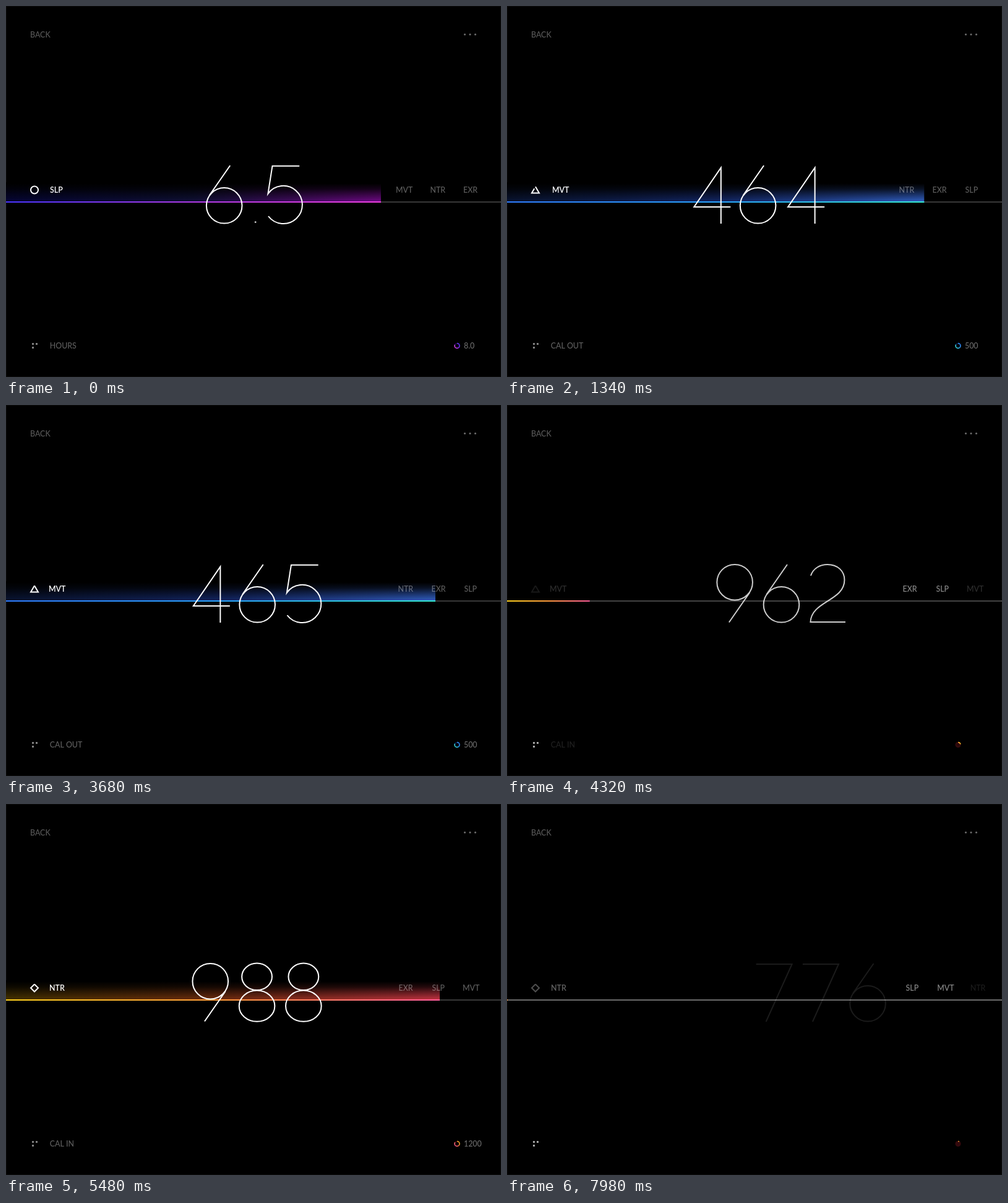
An HTML page with a canvas for the animation above (8000 ms loop, 800 by 600 pixels).

```html
<!DOCTYPE html>
<html lang="en">
<head>
<meta charset="utf-8">
<title>Daily tracker</title>
<style>
html, body { margin: 0; width: 100%; height: 100%; overflow: hidden; background: #000; }
canvas { display: block; }
</style>
</head>
<body>
<canvas id="stage" width="800" height="600"></canvas>
<script>
const ctx = document.getElementById('stage').getContext('2d');
const LOOP = 8000, SETTLED = 1800, STARTS = [0, 3680, 7480];

const modes = [
  { name: 'SLP', icon: 'circle', value: '6.5', unit: 'HOURS', goal: '8.0', bar: 606, dx: -3.7, slots: [630, 685.5, 739],
    line: ['#4a35ff', '#b03ae6', '#ee3fe0'], glow: ['#06063a', '#10123a', '#780a90'], ring: ['#3a0f78', '#8a3cff'] },
  { name: 'MVT', icon: 'triangle', value: 465, unit: 'CAL OUT', goal: '500', bar: 694, slots: [633.5, 687.5, 740.5],
    line: ['#2f7dff', '#2aa5ff', '#35ecd2'], glow: ['#0a1636', '#14286a', '#3566d2'], ring: ['#14307a', '#2fb0ff'] },
  { name: 'NTR', icon: 'diamond', value: 988, unit: 'CAL IN', goal: '1200', bar: 701, slots: [634.5, 688.5, 738],
    line: ['#ffd21e', '#ff9a3c', '#ff5c9a'], glow: ['#4a3600', '#7a3010', '#d03646'], ring: ['#5a1018', '#ff7a45'] },
  { name: 'EXR', icon: 'circle', value: 808, unit: 'STEPS', goal: '900', bar: 690, slots: [634, 685, 738.5],
    line: ['#3cff8c', '#a0f050', '#f0f050'], glow: ['#042a10', '#20501a', '#70a030'], ring: ['#104a20', '#60e070'] }
];

const clamp = v => Math.min(1, Math.max(0, v));
const ramp = (t, a, b) => clamp((t - a) / (b - a));
const mix = (a, b, k) => a + (b - a) * k;
const inOut = p => p < .5 ? 4 * p ** 3 : 1 - 4 * (1 - p) ** 3;

// Remaining distance (1 to 0) of a critically damped spring.
function spring(t, start, rate = .0066) {
  if (t >= SETTLED) return 0;
  const x = Math.max(0, t - start) * rate;
  return (1 + x) * Math.exp(-x);
}

const white = a => `rgba(255,255,255,${a})`;

function text(s, x, y, alpha, weight = 500) {
  if (alpha <= 0) return;
  ctx.font = `${weight} 12.4px Lato, sans-serif`;
  ctx.fillStyle = white(alpha);
  ctx.fillText(s, x, y);
}

// Digits: thin strokes, origin at the left edge of the ink, y in stage units.
const glyphs = {
  0: 'M1 304.7A28.7 46.7 0 1 1 58.4 304.7A28.7 46.7 0 1 1 1 304.7Z',
  1: 'M20 272L36 260V352',
  2: 'M2 276C6 264 17 258 29 258C45 258 56.5 268 56.5 283C56.5 317 3 317 1.5 351H58',
  3: 'M5 272A24 22 0 1 1 29 301A28 25 0 1 1 2 334',
  4: 'M46.5 352V261.5L3 325H62',
  5: 'M53 258.7H9.3L2.2 303.6A30.6 30.6 0 1 1 2.8 340',
  6: 'M39.3 258L5.8 306.2M1 322.8A28.8 28.8 0 1 1 58.6 322.8A28.8 28.8 0 1 1 1 322.8Z',
  7: 'M0 259H58L16 352',
  8: 'M5.4 279.3A24.4 21.7 0 1 1 54.2 279.3A24.4 21.7 0 1 1 5.4 279.3ZM1 326.7A28.8 25.1 0 1 1 58.6 326.7A28.8 25.1 0 1 1 1 326.7Z',
  9: 'M20.5 351.5L54 303.3M1 286.7A28.8 28.8 0 1 1 58.6 286.7A28.8 28.8 0 1 1 1 286.7Z',
  '.': 'M3.7 349.5H6.2'
};
for (const key in glyphs) glyphs[key] = new Path2D(glyphs[key]);
const advance = c => c === '.' ? 23 : c === '4' ? 76.5 : 75.3;

function number(value, dx, alpha) {
  if (alpha <= 0) return;
  const chars = [...String(value)];
  const total = chars.reduce((sum, c) => sum + advance(c), 0);
  ctx.save();
  ctx.strokeStyle = white(alpha);
  ctx.lineWidth = 2;
  ctx.translate(405.9 + dx - total / 2 + 7.5, 0);
  for (const c of chars) {
    ctx.stroke(glyphs[c]);
    ctx.translate(advance(c), 0);
  }
  ctx.restore();
}

const outlines = {
  circle: [new Path2D('M46 291.5A6 6 0 1 1 46 303.5A6 6 0 1 1 46 291.5'), 37.7],
  triangle: [new Path2D('M46 292.3L52 302.5H40L46 292.3'), 35.7],
  diamond: [new Path2D('M46 291.5L40 297.5L46 303.5L52 297.5L46 291.5'), 34]
};

function icon(kind, drawn, alpha) {
  if (alpha <= 0 || drawn <= 0) return;
  const [path, length] = outlines[kind];
  ctx.save();
  ctx.strokeStyle = white(alpha);
  ctx.lineWidth = 2;
  if (drawn < 1) ctx.setLineDash([length * drawn, length]);
  ctx.stroke(path);
  ctx.restore();
}

function across(width, colours) {
  const g = ctx.createLinearGradient(0, 0, width, 0);
  colours.forEach((c, i) => g.addColorStop(i / (colours.length - 1), c));
  return g;
}

function bar(mode, width, glow, trackAlpha) {
  if (glow > 0 && width > 1) {
    ctx.globalAlpha = glow;
    ctx.fillStyle = across(width, mode.glow);
    ctx.fillRect(0, 286, width, 31);
    ctx.globalAlpha = 1;
    const shade = ctx.createLinearGradient(0, 287, 0, 317);
    shade.addColorStop(0, 'rgba(0,0,0,1)');
    shade.addColorStop(.3, 'rgba(0,0,0,.82)');
    shade.addColorStop(1, 'rgba(0,0,0,.05)');
    ctx.fillStyle = shade;
    ctx.fillRect(0, 285, width + 1, 32);
  }
  ctx.fillStyle = white(trackAlpha);
  ctx.fillRect(0, 316, 800, 2);
  ctx.fillStyle = across(Math.max(width, 1), mode.line);
  ctx.fillRect(0, 316, Math.max(width, 1), 2);
}

function ring(mode, part) {
  const [dark, bright] = mode.ring;
  ctx.fillStyle = dark;
  ctx.globalAlpha = .6;
  ctx.beginPath();
  ctx.arc(729, 549.5, 4.5, 0, 7);
  ctx.fill();
  ctx.globalAlpha = 1;
  ctx.fillStyle = '#000';
  ctx.globalAlpha = part;
  ctx.beginPath();
  ctx.arc(729, 549.5, 2.8, 0, 7);
  ctx.fill();
  ctx.globalAlpha = 1;
  const sweep = ctx.createLinearGradient(733, 546, 725, 552);
  sweep.addColorStop(0, mode.line[0]);
  sweep.addColorStop(.5, bright);
  sweep.addColorStop(1, mode.line[2]);
  ctx.strokeStyle = sweep;
  ctx.lineWidth = 1.5;
  ctx.beginPath();
  ctx.arc(729, 549.5, 4, -Math.PI / 2, -Math.PI / 2 + part * 2 * Math.PI);
  ctx.stroke();
}

// Upcoming modes move one slot to the left; a new one enters at the right.
function queue(index, t, pulse) {
  const from = modes[index].slots, to = modes[index + 1].slots;
  const left = spring(t, 40);
  const name = k => modes[(index + k) % 4].name;
  text(name(1), from[0] - 53 * (1 - left), 302, .37 * (1 - ramp(t, 60, 350)));
  for (let k = 0; k < 2; k++) {
    text(name(k + 2), mix(to[k], from[k + 1], left), 302, .37 + .17 * pulse);
  }
  text(name(4), to[2] + 53 * left, 302, .37 * ramp(t, 300, 1000));
}

function frame(time) {
  const index = STARTS.filter(s => s <= time).length - 1;
  const t = time - STARTS[index];
  const old = modes[index], next = modes[index + 1];
  const pulse = ramp(t, 100, 450) * (1 - ramp(t, 640, 1200));

  ctx.fillStyle = '#000';
  ctx.fillRect(0, 0, 800, 600);
  ctx.strokeStyle = '#0c0c0c';
  ctx.lineWidth = 1;
  ctx.strokeRect(.5, .5, 799, 599);

  const leaving = t < 520;
  const mode = leaving ? old : next;
  const fill = leaving ? 1 - inOut(t / 520) : 1 - spring(t, 520);
  const glow = leaving ? 1 - ramp(t, 0, 360) : ramp(t, 680, 1250);
  const track = .22 + .2 * ramp(t, 100, 450) * (1 - ramp(t, 500, 680));
  bar(mode, mode.bar * fill, glow, track);

  text('BACK', 39, 51, .35);
  ctx.fillStyle = '#6c6c6c';
  for (const x of [741.5, 750, 758.5]) {
    ctx.beginPath();
    ctx.arc(x, 46, 1.6, 0, 7);
    ctx.fill();
  }

  queue(index, t, pulse);

  icon(old.icon, 1, 1 - ramp(t, 60, 700));
  text(old.name, old.icon === 'triangle' ? 69 : 71, 302, 1 - ramp(t, 100, 750), 600);
  const arrive = spring(t, 750);
  const nameX = next.icon === 'triangle' ? 69 : 70;
  icon(next.icon, 1 - arrive, 1);
  text(next.name, nameX + 40 * arrive, 302, ramp(t, 750, 1150), 600);

  const gone = ramp(t, 0, 400);
  number(old.value, (old.dx || 0) - 100 * gone * gone, 1 - gone);
  const lag = t < SETTLED ? .026 * Math.exp((640 - t) / 330) : 0;
  number(Math.round(next.value * (1 - lag)), 147 * spring(t, 400, .011), ramp(t, 480, 680));

  ctx.fillStyle = white(.5 + .14 * pulse);
  for (const [x, y] of [[42, 545], [48, 545], [42, 551]]) ctx.fillRect(x, y, 3, 3);
  text(old.unit, 70.7, 554, .37 * (1 - ramp(t, 0, 400)));
  text(next.unit, 70.7, 554, .37 * ramp(t, 560, 800));

  ring(mode, leaving ? mix(.07, .82, fill) : mix(.07, .85, fill));
  text(old.goal, 740, 554, .42 * (1 - ramp(t, 0, 400)));
  text(next.goal, 740, 554, .42 * ramp(t, 800, 1200));
}

const begin = performance.now();
function tick() {
  frame((performance.now() - begin) % LOOP);
  requestAnimationFrame(tick);
}
tick();
</script>
</body>
</html>
```
